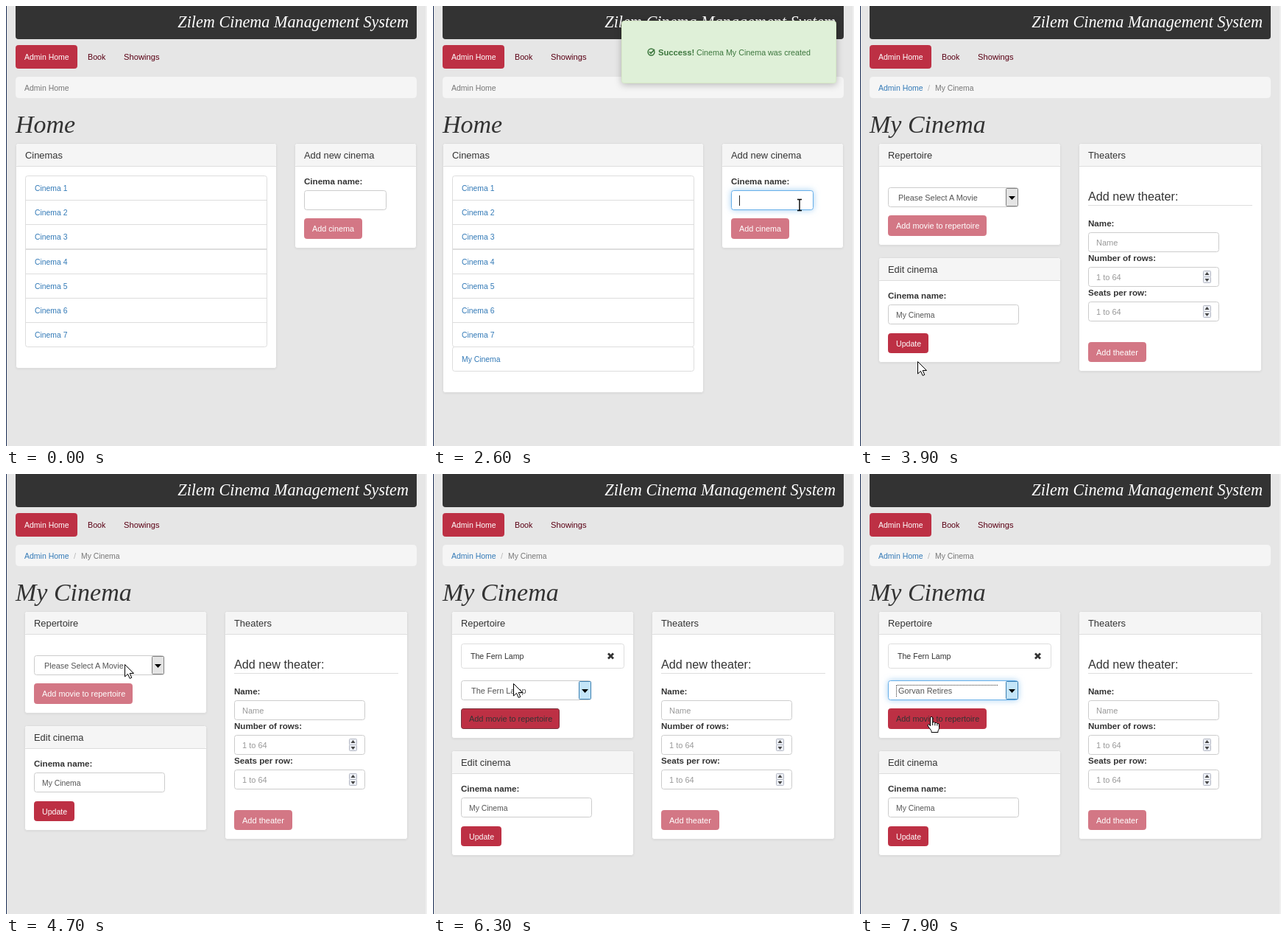
These frames come from a looping animation (572 by 597 pixels, 8 s). An HTML page:

```html
<!DOCTYPE html>
<html lang="en">
<head>
<meta charset="utf-8">
<title>Cinema management</title>
<style>
html, body { margin: 0; width: 100%; height: 100%; overflow: hidden; background: #e6e6e6; }
svg { display: block; width: 572px; height: 597px; }
text { font-family: "Liberation Sans", Arial, sans-serif; fill: #333; white-space: pre; }
.serif { font-family: "Liberation Serif", "Times New Roman", serif; font-style: italic; }
.bold { font-weight: bold; }
.white { fill: #fff; }
.link { fill: #337ab7; }
.nav { fill: #5a0014; }
.muted { fill: #777; }
.hint { fill: #999; }
.input { fill: #555; }
.ok { fill: #3c763d; }
.off { opacity: .65; }
.focus { stroke: #66afe9; filter: drop-shadow(0 0 4px rgba(102, 175, 233, .6)); }
.dots { fill: none; stroke: #333; stroke-dasharray: 1 1; }
.panel { filter: drop-shadow(0 1px 1px rgba(0, 0, 0, .06)); }
.note { filter: drop-shadow(0 2px 5px rgba(0, 0, 0, .25)); }
.hot { fill: #23527c; text-decoration: underline; }
</style>
</head>
<body>
<svg id="stage" viewBox="0 0 572 597"></svg>
<script>
const RED = '#bd3044';
const PROMPT = 'Please Select A Movie';
const FIRST = 'The Fern Lamp', SECOND = 'Gorvan Retires';
const MOVIES = [PROMPT, FIRST, "Six Ran Under the Miller's Cart", SECOND, 'The Ladle Man',
  "Morton Pellam's Week Out", 'The Ru Palto Knot', 'Umbel'];
const LOOP = 8000, TICK = 100;

// Drawing helpers, each returning SVG markup
const text = (x, y, s, cls = '', size = 11, more = '') =>
  `<text x="${x}" y="${y}" class="${cls}" style="font-size:${size}px" ${more}>${s}</text>`;
const box = (x, y, w, h, fill = '#fff', stroke = '#ccc', r = 3, more = '') =>
  `<rect x="${x + .5}" y="${y + .5}" width="${w - 1}" height="${h - 1}" rx="${r}" fill="${fill}" stroke="${stroke}" ${more}/>`;
const path = (d, fill = 'none', stroke = 'none', more = '') =>
  `<path d="${d}" fill="${fill}" stroke="${stroke}" ${more}/>`;
const group = (id, body, more = '') => `<g id="${id}" ${more}>${body}</g>`;

const panel = (id, x, y, w, h, title) =>
  box(x, y, w, h, '#fff', '#ddd', 3, `id="${id}" class="panel"`) +
  box(x + 1, y + 1, w - 2, 30, '#f5f5f5', '#f5f5f5', 2) +
  path(`M${x + 1} ${y + 31.5}h${w - 2}`, 'none', '#ddd') +
  text(x + 13, y + 21, title, '', 12.9);
const button = (id, x, y, w, h, label, off, size = 11) =>
  group(id, box(x, y, w, h, RED, RED) + text(x + 11, y + 18, label, 'white', size), off ? 'class="off"' : '');
const field = (y, label, hint, spin) =>
  text(310, y - 8, label, 'bold', 11.6) + box(310, y, 178, 27) + text(321, y + 18, hint, 'hint') +
  (spin ? box(466, y + 5, 11, 9, '#eceff5', '#b4b8c4', 1) + box(466, y + 13, 11, 9, '#eceff5', '#b4b8c4', 1) +
    path(`M468.5 ${y + 11}h6l-3-4zM468.5 ${y + 16}h6l-3 4z`, '#444') : '');

const rowY = i => 230 + Math.floor(33.2 * i + .45);
const rows = Array.from({ length: 7 }, (_, i) =>
  (i ? path(`M26 ${rowY(i) + (i === 3 ? 0 : .5)}h329`, 'none', '#ddd', i === 3 ? 'stroke-width="2"' : '') : '') +
  text(39, rowY(i) + 21, `Cinema ${i + 1}`, 'link', 10.4)).join('');

const frame =
  path('M.5 0V597', 'none', '#1b2f55') + path('M571 0V597', 'none', '#efefef', 'stroke-width="2"') +
  path('M13 0H558V41a4 4 0 0 1-4 4H17a4 4 0 0 1-4-4z', '#333') +
  text(547, 29, 'Zilem Cinema Management System', 'serif white', 22.2, 'text-anchor="end"') +
  box(13, 53, 84, 32, RED, RED) + text(25, 73, 'Admin Home', 'white', 10.5) +
  text(111, 73, 'Book', 'nav', 10.7) + text(160, 73, 'Showings', 'nav', 11.2) +
  box(13, 96, 545, 29, '#f5f5f5', '#f5f5f5', 4);

const home = group('home',
  text(25, 115, 'Admin Home', 'muted', 10.5) + text(13, 172, 'Home', 'serif', 34) +
  panel('listPanel', 13, 186, 355, 306, 'Cinemas') + box(26, 230, 329, 233, '#fff', '#ddd') + rows +
  group('newRow', box(26, 462, 329, 34, '#fff', '#ddd') +
    text(39, 483, 'My Cinema', 'link', 10.4, 'id="newLink"') +
    box(39, 473, 52, 13, 'none', '#333', 0, 'class="dots" id="linkDots"')) +
  panel('addPanel', 392, 186, 166, 143, 'Add new cinema') +
  text(405, 242, 'Cinema name:', 'bold', 11.6) +
  box(405, 250, 112, 27, '#fff', '#ccc', 3, 'id="nameBox"') +
  text(416, 268, '', 'input', 10.4, 'id="typed"') +
  path('M.5 257v14', 'none', '#222', 'id="caret"') +
  button('addCinema', 405, 288, 79, 28, 'Add cinema', true, 10.8) +
  group('note', box(256, 20, 292, 85, '#dff0d8', '#d6e9c6', 3, 'class="note"') +
    '<circle cx="296.5" cy="62.5" r="4.4" fill="none" stroke="#3c763d" stroke-width="1.5"/>' +
    path('M294 62l2 2.2 5-5.2', 'none', '#3c763d', 'stroke-width="1.7"') +
    text(306, 67, 'Success!', 'ok bold', 11.2) + text(358, 67, 'Cinema My Cinema was created', 'ok', 10.72)));

const picker = group('picker',
  box(38, 246, 177, 27, '#fff', '#ccc', 3, 'id="selectBox"') +
  text(52, 264, PROMPT, 'input', 10.9, 'id="choice"') +
  path('M49.5 268V252.5H188', 'none', '#333', 'class="dots" id="selectDots"') +
  box(198, 247, 17, 25, '#e4e4e4', '#808080', 1, 'id="arrowBox"') + path('M202 258h9l-4.5 5z', '#000') +
  button('addMovie', 38, 284, 134, 28, 'Add movie to repertoire', true, 10.9) +
  box(38, 284, 134, 28, 'none', '#333', 3, 'class="dots" id="movieDots"'));

const cinema = group('cinema',
  text(25, 115, 'Admin Home', 'link', 10.5) + text(92, 115, '/', '', 11, 'fill-opacity=".3"') +
  text(102, 115, 'My Cinema', 'muted', 10.4) + text(13, 172, 'My Cinema', 'serif', 34) +
  panel('repPanel', 25, 186, 248, 139, 'Repertoire') +
  group('added', box(38, 230, 222, 34, '#fff', '#ddd') + text(51, 251, FIRST, '', 10.6) +
    path('M238 243.5l7 7m0-7l-7 7', 'none', '#333', 'stroke-width="2.8"')) +
  picker +
  group('edit', panel('editPanel', 25, 341, 248, 143, 'Edit cinema') +
    text(38, 397, 'Cinema name:', 'bold', 11.6) + box(38, 405, 178, 27) +
    text(49, 423, 'My Cinema', 'input', 10.4) + button('update', 38, 444, 55, 27, 'Update', false, 10.6)) +
  panel('roomPanel', 297, 186, 249, 310, 'Theaters') +
  text(310, 264, 'Add new theater:', '', 16.2) + path('M310 270.5H533', 'none', '#ddd') +
  field(307, 'Name:', 'Name') + field(354, 'Number of rows:', '1 to 64', true) +
  field(401, 'Seats per row:', '1 to 64', true) +
  button('addRoom', 310, 456, 79, 27, 'Add theater', true) +
  group('menu', ''));

const pointers =
  group('arrow', path('M.5.5V17l4-3.6 2.7 6 2.6-1.1-2.6-5.8h5.3z', '#fff', '#000')) +
  group('beam', path('M-3-7.5h2.5q.5 0 .5.5q0-.5.5-.5H3M-3 7.5h2.5q.5 0 .5-.5q0 .5.5.5H3M0-7V7', 'none', '#000', 'stroke-width="1.4"')) +
  group('hand', path('M-1.5 13V2q0-1.6 1.6-1.6T1.7 2V8q2.6-1.2 3.2.6q2.4-.8 3 .8q2.6-.4 2.6 1.6v4.5q0 2-1.5 4V21.5H0V19.5L-4.6 13q-1-2 .6-2.4t2.5 2.4z', '#fff', '#000') +
    path('M1.7 8v4M4.9 9v3.4M7.9 10v2.6', 'none', '#000'));

document.getElementById('stage').innerHTML = frame + home + cinema + group('pointer', pointers);
const $ = id => document.getElementById(id);
const show = (id, on) => { $(id).style.display = on ? '' : 'none'; };
const within = (t, a, b) => t >= a && t < b;

// Pointer waypoints: time, x, y
const route = [
  [100, 2, 504], [200, 90, 470], [400, 320, 360], [600, 480, 280], [700, 498, 270], [2900, 498, 270],
  [3000, 450, 285], [3100, 363, 315], [3400, 153, 428], [3500, 140, 441], [3600, 107, 466], [3800, 78, 482],
  [4000, 78, 482], [4200, 108, 420], [4400, 150, 300], [4600, 160, 262], [4700, 161, 258],
  [5000, 161, 258], [5400, 115, 291], [5700, 115, 291], [5900, 110, 298], [6100, 110, 298],
  [6300, 109, 284], [6500, 109, 288], [6900, 95, 342], [7100, 95, 342], [7600, 89, 344], [7800, 89, 344], [7900, 97, 329]];
// Typing: time, text length
const keys = [[1100, 1], [1400, 2], [1500, 3], [1700, 4], [1800, 5], [2000, 6], [2100, 8], [2200, 9], [2600, 0]];

function pointAt(t) {
  const i = route.findIndex(p => p[0] > t);
  if (i < 0) return route[route.length - 1].slice(1);
  if (!i) return route[0].slice(1);
  const [a, b] = [route[i - 1], route[i]], k = (t - a[0]) / (b[0] - a[0]);
  return [1, 2].map(n => Math.round(a[n] + (b[n] - a[n]) * k));
}

function drawHome(t) {
  const created = t >= 2600;
  ['newRow', 'note'].forEach(id => show(id, created));
  $('listPanel').setAttribute('height', created ? 338 : 305);
  $('newLink').setAttribute('class', t >= 3700 ? 'link hot' : 'link');
  show('linkDots', t >= 3800);
  $('nameBox').setAttribute('class', t >= 700 ? 'focus' : '');
  const count = keys.reduce((n, k) => t >= k[0] ? k[1] : n, 0);
  $('typed').textContent = 'My Cinema'.slice(0, count);
  show('caret', within(t, 700, 3800));
  $('caret').setAttribute('transform', `translate(${416 + Math.round($('typed').getComputedTextLength())})`);
  $('addCinema').setAttribute('class', within(t, 1100, 2600) ? '' : 'off');
}

function drawMenu(t, y) {
  const reopened = t >= 6500;
  show('menu', within(t, 4800, 5600) || within(t, 6500, 7100));
  const items = reopened ? MOVIES.filter(m => m !== FIRST) : MOVIES;
  const top = 274 + (reopened ? 34 : 0);
  const active = Math.max(0, Math.floor((y - top) / 14));
  $('menu').innerHTML = box(38, top - 1, 189, items.length * 14 + 2, '#fff', '#000', 0) +
    items.map((m, i) => (i === active ? box(39, top + i * 14, 187, 14, '#39f', '#39f', 0) : '') +
      text(41, top + 11 + i * 14, m, i === active ? 'white' : 'input', 10.75)).join('');
}

function drawCinema(t, y) {
  const added = t >= 6100, shift = added ? 34 : 0;
  show('added', added);
  $('repPanel').setAttribute('height', 138 + shift);
  ['picker', 'edit'].forEach(id => $(id).setAttribute('transform', `translate(0 ${shift})`));
  const focused = within(t, 4800, 5900) || t >= 6500;
  $('selectBox').setAttribute('class', focused ? 'focus' : '');
  show('selectDots', focused);
  const blue = t >= 4800;
  $('arrowBox').setAttribute('fill', blue ? '#c4e5f8' : '#e4e4e4');
  $('arrowBox').setAttribute('stroke', blue ? '#3c7fb1' : '#808080');
  $('choice').textContent = t >= 7100 ? SECOND : t >= 5600 ? FIRST : PROMPT;
  const chosen = t >= 5600;
  $('addMovie').setAttribute('class', chosen ? '' : 'off');
  $('addMovie').lastChild.setAttribute('class', chosen ? '' : 'white');
  show('movieDots', within(t, 5900, 6500));
  drawMenu(t, y);
}

function draw(t) {
  const [x, y] = pointAt(t), onHome = t < 3900;
  show('home', onHome);
  show('cinema', !onHome);
  if (onHome) drawHome(t); else drawCinema(t, y);
  const beam = within(t, 700, 3000), hand = within(t, 5700, 6100) || t >= 7100;
  show('pointer', t >= 100);
  show('beam', beam);
  show('hand', hand);
  show('arrow', !beam && !hand);
  $('pointer').setAttribute('transform', `translate(${x} ${y})`);
}

let last = -1;
function loop() {
  const t = Math.floor(performance.now() % LOOP / TICK) * TICK;
  if (t !== last) draw(last = t);
  requestAnimationFrame(loop);
}
loop();
</script>
</body>
</html>
```
